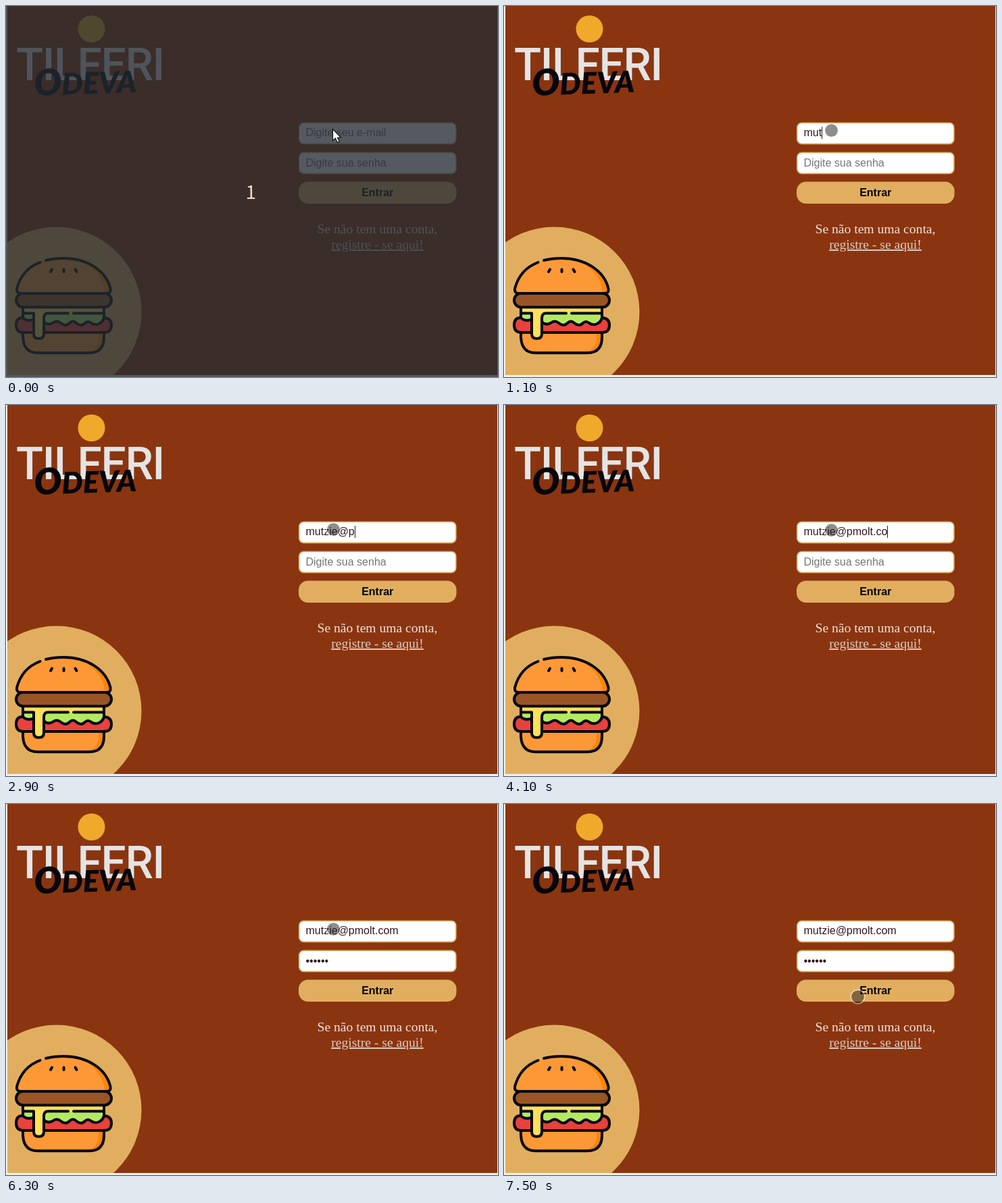
An HTML page for the animation above (8000 ms loop, 728 by 550 pixels).

```html
<!DOCTYPE html>
<html lang="pt-BR">
<head>
<meta charset="utf-8">
<title>Entrar</title>
<style>
  html, body { margin: 0; width: 100%; height: 100%; overflow: hidden; background: #f0f0f0; }
  svg { display: block; width: 728px; height: 550px; }
  text { white-space: pre; }
  .sans { font: 16px "Liberation Sans", Arial, sans-serif; }
  .serif { font: 19.6px "Liberation Serif", serif; text-anchor: middle; fill: #efe2da; }
  .field { fill: #fff; stroke: #e0ad5f; stroke-width: 1.6; }
  .hint { fill: #757575; }
  .typed { fill: #35151a; }
  .line { fill: none; stroke: #05070d; stroke-width: 4; stroke-linecap: round; stroke-linejoin: round; }
  .sign { font: 500 66px Roboto, sans-serif; letter-spacing: -1.3px; fill: #e4e4e4; }
  .script { font: italic 900 44px Lato, sans-serif; fill: #06060c; }
  .script tspan:first-child { font-size: 54px; }
</style>
</head>
<body>
<svg viewBox="0 0 728 550">
  <clipPath id="page"><rect x="2" width="725" height="547"/></clipPath>
  <rect width="728" height="550" fill="#f0f0f0"/>
  <g clip-path="url(#page)">
    <rect width="728" height="550" fill="#8a3510"/>
    <circle cx="74.5" cy="453.5" r="126" fill="#e1ae60"/>
  </g>

  <!-- brand -->
  <circle cx="126.5" cy="34" r="20" fill="#f0a92a"/>
  <text class="sign" x="15" y="110">TILFERI</text>
  <text class="script" x="42" y="133" transform="rotate(-2 42 133)"><tspan>O</tspan><tspan>DEVA</tspan></text>

  <!-- burger -->
  <g>
    <path fill="#fd9837" d="M22 426Q15 426 16 419C22 392 50 374 85 374C120 374 148 392 154.500 419Q155.500 426 149 426Z"/>
    <path fill="#fb8604" d="M108 377C136 385 150 400 154.500 419Q155.500 426 149 426H146C146 408 132 387 108 377Z"/>
    <path fill="#fd9837" d="M25 484V491Q26 514.300 47 514.300H123Q145 514.300 145 491V484Z"/>
    <path fill="#fb8604" d="M137 484H145V491Q145 514.300 123 514.300H115Q137 512 137 491Z"/>
    <rect x="15" y="462" width="141" height="22" rx="11" fill="#e8413e"/>
    <path fill="#b4ea62" d="M25 455H145V462C143 471 133 475 126 470Q121 466 117 470Q111 476 104 470Q99 465 94 470Q88 476 81 470Q75 465 69 470Q61 474 56 468L41 465Q30 469 25 462Z"/>
    <path fill="#ffe05a" d="M25 447H145V456H62Q56 456 56 463V486Q56 493 48.500 493Q41 493 41 486V456H25Z"/>
    <rect x="15" y="426" width="141" height="20.500" rx="10.250" fill="#9a5526"/>
    <g class="line">
      <path d="M50.500 380C32 387 21 400 16 419Q15 426 22 426H149Q155.500 426 154.500 419C148 392 120 374 85 374Q71 374 59 377"/>
      <path d="M68 390.500L66 394M85.500 390.500V394M102.500 390.500L104.500 394"/>
      <rect x="15" y="426" width="141" height="20.500" rx="10.250"/>
      <path d="M25 448V462M145 448V462M26 455.500H41V486Q41 493 48.500 493Q56 493 56 486V463Q56 455.500 62 455.500H92M100 455.500H145"/>
      <path d="M56 468Q61 474 69 470Q75 465 81 470Q88 476 94 470Q99 465 104 470Q111 476 117 470Q121 466 126 470C133 475 143 471 145 462Q156 463 156 473Q156 484 145 484H57"/>
      <path d="M41 484H26Q15 484 15 473Q15 462 25 462Q30 468 40 465"/>
      <path d="M25 485V491Q26 514.300 47 514.300H123Q145 514.300 145 491V485"/>
    </g>
  </g>

  <!-- form -->
  <rect class="field" x="433.700" y="173.200" width="232.200" height="31.200" rx="7"/>
  <rect class="field" x="433.700" y="217.200" width="232.200" height="31.200" rx="7"/>
  <rect x="433" y="260.500" width="233.500" height="32.500" rx="14" fill="#e1ae60"/>
  <text id="mail" class="sans" x="443.500" y="193"></text>
  <text id="pass" class="sans" x="443.500" y="238"></text>
  <text class="sans" x="549.700" y="282" text-anchor="middle" style="font-weight:bold">Entrar</text>
  <text class="serif" x="549.500" y="337">Se não tem uma conta,</text>
  <text class="serif" x="549.500" y="360" text-decoration="underline" style="fill:#dccbc0">registre - se aqui!</text>
  <rect id="caret" width="1" height="18" fill="#35151a"/>

  <g id="dot">
    <circle r="9.500" fill="#1e1e1e" fill-opacity=".5"/>
    <circle r="10.200" fill="none" stroke="#fff" stroke-opacity=".5" stroke-width="1.500"/>
  </g>

  <g id="intro">
    <rect width="728" height="550" fill="#232b32" fill-opacity=".775"/>
    <path d="M483.500 182.500V199.500L487.500 196L490.300 202.200L493.300 200.900L490.500 195H495.500Z" fill="#fff" stroke="#111" stroke-width="1.200"/>
    <text x="354.500" y="286" fill="#f5d8c8" style="font:28px 'Noto Sans CJK JP','Noto Sans CJK',sans-serif">1</text>
  </g>
</svg>
<script>
  const LOOP = 8000, LEFT = 443.5;
  const $ = id => document.getElementById(id);

  const fields = [
    { el: $("mail"), value: "mutzie@pmolt.com", hint: "Digite seu e-mail",
      keys: [600, 800, 1100, 1500, 1600, 1800, 2400, 2900, 3200, 3400, 3500, 3600, 3800, 4100, 4100, 4300] },
    { el: $("pass"), value: "\u2022".repeat(6), hint: "Digite sua senha",
      keys: [5000, 5200, 5400, 5500, 5700, 5800] }
  ];

  // time, x, y: each pose holds until the next
  const moves = [
    [0, 484.5, 184.5], [2200, 484, 183.5], [2400, 484.5, 184.5], [3500, 484.5, 185.5],
    [6600, 487, 193], [6700, 498, 226], [6800, 521, 263], [6900, 535.5, 281], [7000, 523.5, 285.7]
  ];

  // spans in which the caret is lit
  const lit = [[600, 6300], [6900, 7500]];

  const show = (el, on) => el.setAttribute("visibility", on ? "visible" : "hidden");

  function type({ el, value, hint, keys }, t) {
    const n = keys.filter(k => k <= t).length;
    const text = n ? value.slice(0, n) : hint;
    if (el.textContent !== text) el.textContent = text;
    el.setAttribute("class", "sans " + (n ? "typed" : "hint"));
    return n ? el.getComputedTextLength() : 0;
  }

  function draw(t) {
    const widths = fields.map(f => type(f, t));
    const focus = t < 4600 ? 0 : 1;
    $("caret").setAttribute("x", Math.round(LEFT + widths[focus]));
    $("caret").setAttribute("y", focus ? 224 : 179);
    show($("caret"), lit.some(([a, b]) => t >= a && t < b));

    const [, x, y] = moves.filter(m => m[0] <= t).pop();
    $("dot").setAttribute("transform", `translate(${x} ${y})`);
    show($("dot"), t >= 400);
    show($("intro"), t < 400);
  }

  const start = performance.now();
  function tick() {
    draw((performance.now() - start) % LOOP);
    requestAnimationFrame(tick);
  }
  tick();
</script>
</body>
</html>
```
